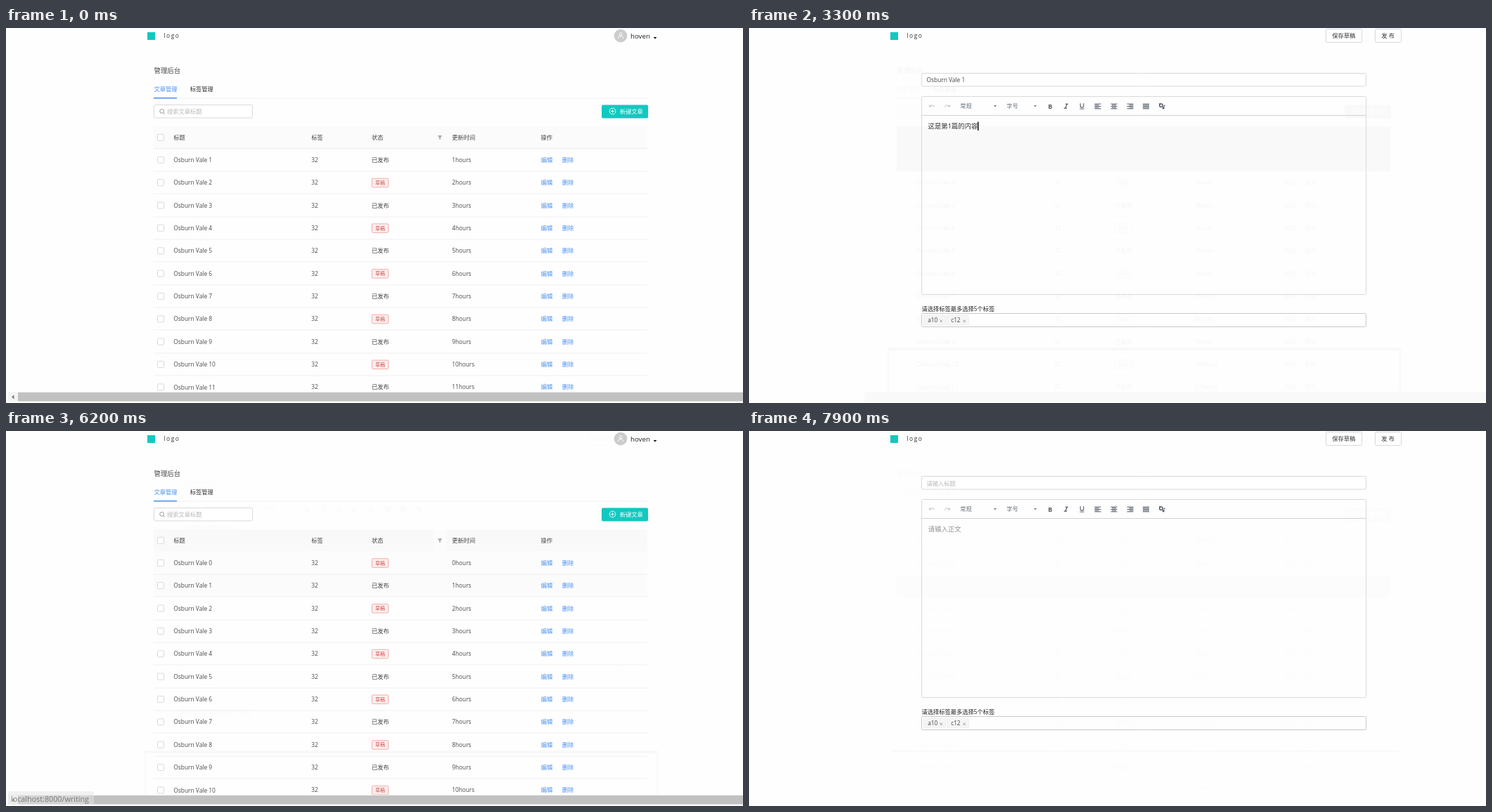
Recreate the animation shown at these times as an HTML page with a canvas. Size 1048x534 px, loop 8000 ms.

```html
<!DOCTYPE html>
<html lang="zh">
<head>
<meta charset="utf-8">
<title>管理后台</title>
<style>
html, body { margin: 0; width: 100%; height: 100%; overflow: hidden; background: #fefefe; }
canvas { display: block; }
</style>
</head>
<body>
<canvas id="stage" width="1048" height="534"></canvas>
<script>
const W = 1048, H = 534, LOOP = 8000, STEP = 100;
const FONT = '"Open Sans", "Noto Sans CJK SC", "Noto Sans CJK", sans-serif';
const BG = '#fefefe', INK = '#4a4a4a', BLUE = '#4a90f5', TEAL = '#13c8c0', BORDER = '#d9d9d9';
const ROW_TOP = 171.6, ROW_H = 32.36, ROWS = 11;
const PERSON = 'Osburn Vale', USER = 'hoven';

const screen = document.getElementById('stage').getContext('2d');
let c = screen;

// drawing helpers
function text(str, x, y, color = INK, size = 8.25, style = '') {
  c.font = `${style} ${size}px ${FONT}`;
  c.fillStyle = color;
  c.fillText(str, x, y + size * 0.37);
}

function rect(x, y, w, h, color) {
  c.fillStyle = color;
  c.fillRect(x, y, w, h);
}

function box(x, y, w, h, stroke, fill, r = 2) {
  c.beginPath();
  c.roundRect(x, y, w, h, r);
  if (fill) { c.fillStyle = fill; c.fill(); }
  if (stroke) { c.strokeStyle = stroke; c.lineWidth = 1; c.stroke(); }
}

function line(points, color, width = 1) {
  c.beginPath();
  points.forEach(([x, y]) => c.lineTo(x, y));
  c.strokeStyle = color;
  c.lineWidth = width;
  c.stroke();
}

function shape(points, color) {
  c.beginPath();
  points.forEach(([x, y]) => c.lineTo(x, y));
  c.fillStyle = color;
  c.fill();
}

function arc(x, y, r, color, width, from = 0, to = Math.PI * 2) {
  c.beginPath();
  c.arc(x, y, r, from, to);
  if (width) { c.strokeStyle = color; c.lineWidth = width; c.stroke(); }
  else { c.fillStyle = color; c.fill(); }
}

function caretDown(x, y, color, r = 2) {
  shape([[x - r, y - r / 2], [x + r, y - r / 2], [x, y + r / 2]], color);
}

// shared header
function brand() {
  rect(201, 6, 11, 11, TEAL);
  c.letterSpacing = '1.5px';
  text('logo', 224.5, 11, '#333', 8.4);
  c.letterSpacing = '0px';
}

function account() {
  arc(874, 11, 9.3, '#ccc');
  arc(874, 8.8, 2, '#fff', 0.9);
  arc(874, 15, 3.7, '#fff', 0.9, Math.PI, 0);
  text(USER, 888, 11.3, '#222', 9.7);
  caretDown(923, 14.3, '#111', 2.5);
}

function checkbox(y) {
  box(215.5, y - 4.5, 9, 9, BORDER, '#fff', 1);
}

function row(i, n) {
  const y = 187.8 + ROW_H * i;
  checkbox(y);
  text(`${PERSON} ${n}`, 238.3, y, INK, 8.4);
  text('32', 434.3, y);
  if (n % 2) {
    text('已发布', 520, y, '#444');
  } else {
    box(520.5, y - 6, 23, 12.5, '#f3aaa6', '#fdf0ef', 1);
    text('草稿', 525, y + 0.2, '#cf4a4a', 7);
  }
  text(`${n}hours`, 634.3, y);
  text('编辑', 760.7, y, BLUE);
  text('删除', 790.7, y, BLUE);
  rect(210, Math.round(ROW_TOP + ROW_H * (i + 1)) - 0.5, 702, 1, '#f2f2f2');
}

function scrollbar() {
  rect(3, 518, W - 3, 14, '#f4f4f4');
  rect(17, 519, W - 17, 12.5, '#c1c1c1');
  shape([[8, 525.5], [11.5, 522.5], [11.5, 528.5]], '#777');
}

function listPage(first, opt = {}) {
  const { ink = 1, header = '#fbfbfb', shades = [], filterCell = false } = opt;
  brand();
  account();
  text('管理后台', 210.5, 60.5, '#444', 9.4);
  rect(210, 99.5, 702, 1, '#f1f1f1');
  text('文章管理', 210.5, 87, BLUE);
  text('标签管理', 261.8, 87, '#333');
  rect(210, 99, 33 * ink, 1.5, BLUE);

  box(210.5, 109.5, 140, 18.5, BORDER, '#fff');
  arc(221.6, 118.4, 2.9, '#888', 0.9);
  line([[223.8, 120.6], [225.8, 122.6]], '#888', 0.9);
  text('搜索文章标题', 229, 119, '#b8b8b8');

  box(847, 109.5, 66, 19, null, TEAL);
  arc(862.5, 118.5, 4.4, '#fff', 0.9);
  line([[860.2, 118.5], [864.8, 118.5]], '#fff', 0.9);
  line([[862.5, 116.2], [862.5, 120.8]], '#fff', 0.9);
  text('新键文章', 872.8, 119, '#fff', 8.25, '500');

  rect(210, 140, 702, 31.5, header);
  if (filterCell) rect(608, 140, 18, 31.5, '#fcfcfc');
  shades.forEach((v, i) => {
    if (v > 0) rect(210, ROW_TOP + ROW_H * i, 702, ROW_H, `rgba(0,0,0,${v / 255})`);
  });
  if (!shades[0]) rect(210, 171, 702, 1, '#ececec');
  checkbox(155.8);
  [['标题', 238.3], ['标签', 434.3], ['状态', 520], ['更新时间', 634.3], ['操作', 760.5]]
    .forEach(([label, x]) => text(label, x, 155.8, '#444'));
  shape([[613.8, 153], [620.2, 153], [618, 156], [618, 158.5], [616, 158.5], [616, 156]], '#aaa');
  for (let i = 0; i < ROWS; i++) row(i, first + i);
  scrollbar();
}

// editor page
const UNDO = new Path2D('M12.5 8c-2.65 0-5.05.99-6.9 2.6L2 7v9h9l-3.62-3.62c1.39-1.16 3.16-1.88 5.12-1.88 3.54 0 6.55 2.31 7.6 5.5l2.37-.78C21.08 11.03 17.15 8 12.5 8z');

function arrow(x, dir) {
  c.save();
  c.translate(x, 111);
  c.scale(0.4 * dir, 0.4);
  c.translate(-12, -12);
  c.fillStyle = '#c4c4c4';
  c.fill(UNDO);
  c.restore();
}

function alignIcon(x, anchor, short) {
  for (let i = 0; i < 5; i++) {
    const w = i % 2 ? short : 9;
    rect(x - 4.5 + (9 - w) * anchor, 107.6 + i * 1.7, w, 1, '#555d6b');
  }
}

function toolbar() {
  const dark = '#555d6b';
  arrow(260, 1);
  arrow(282, -1);
  text('常规', 300.3, 111.3, '#6a717d');
  caretDown(350, 111.3, dark);
  text('字号', 366.3, 111.3, '#6a717d');
  caretDown(407, 111.3, dark);
  text('B', 425.2, 111.2, dark, 9, 'bold');
  line([[449.7, 108.3], [453.8, 108.3]], dark, 1.2);
  line([[452.2, 108], [449.9, 114.5]], dark, 1.2);
  line([[447.8, 114.2], [452, 114.2]], dark, 1.2);
  line([[471.2, 107.3], [471.2, 111]], dark, 1.1);
  line([[475.8, 107.3], [475.8, 111]], dark, 1.1);
  arc(473.5, 111, 2.3, dark, 1.1, 0, Math.PI);
  line([[470.3, 115.2], [476.7, 115.2]], dark, 0.9);
  alignIcon(496, 0, 6);
  alignIcon(519, 0.5, 6);
  alignIcon(542, 1, 6);
  alignIcon(564.5, 0, 9);
  arc(586, 110.3, 2.2, dark, 1.5);
  rect(583.2, 107.3, 2, 2, dark);
  line([[590, 114], [590, 110.3], [592, 110.3]], dark, 1);
  arc(589.2, 114, 1.5, dark);
}

function tag(label, x, w) {
  box(x, 409, w, 14, '#efefef', '#f5f5f5', 1);
  text(label, x + 5.7, 416, '#444');
  const m = x + w - 6.3;
  line([[m - 1.7, 415.6], [m + 1.7, 419]], '#888', 0.8);
  line([[m - 1.7, 419], [m + 1.7, 415.6]], '#888', 0.8);
}

function editorPage(blank, caret) {
  brand();
  box(820.5, 1.5, 51, 19, BORDER, '#fff', 1);
  text('保存草稿', 829.3, 11.3, '#333');
  box(890.5, 1.5, 37, 19, BORDER, '#fff', 1);
  text('发 布', 899.3, 11.3, '#333');

  box(245.5, 64.5, 632, 18.5, BORDER, '#fff');
  if (blank) text('请输入标题', 252.5, 74.5, '#b8b8b8');
  else text(`${PERSON} 1`, 252.5, 74.3, '#444', 8.4);

  box(245.5, 97.5, 632, 282, BORDER);
  line([[246, 124.5], [877, 124.5]], '#d2d2d2');
  toolbar();
  if (blank) text('请输入正文', 254.8, 140, '#8f8f8f', 9.4);
  else text('这是第1篇的内容', 254.5, 140, '#333', 9.4);
  if (caret) rect(325, 133.5, 1.5, 12.5, '#111');

  text('请选择标签最多选择5个标签', 245.5, 400, '#222');
  box(245.5, 406.5, 632, 19, '#c9c9c9');
  tag('a10', 248.5, 31);
  tag('c12', 281.5, 31);
}

// faint remains of the previous page
function snapshot(draw) {
  const layer = document.createElement('canvas');
  layer.width = W;
  layer.height = H;
  c = layer.getContext('2d');
  draw();
  c = screen;
  return layer;
}

function remains(layer, alpha) {
  c.save();
  c.globalAlpha = alpha;
  c.filter = 'grayscale(1)';
  c.drawImage(layer, 0, 0);
  c.restore();
}

function cardEdge() {
  rect(197, 455, 730, 4, '#f8f8f8');
  rect(197, 459, 2, 59, '#f9f9f9');
  rect(925, 459, 2, 59, '#f9f9f9');
}

const oldList = snapshot(() => listPage(1));
const oldEditor = snapshot(() => editorPage(false, false));
const newList = snapshot(() => listPage(0));

// timing
const clamp = v => Math.max(0, Math.min(1, v));
const fade = (t, start, steps) => clamp(((t - start) / STEP + 1) / steps);
const ease = p => p < 0.5 ? 4 * p ** 3 : 1 - 4 * (1 - p) ** 3;

const LINKS = [
  // path, fade-in start and steps, fade-out start and steps
  ['management#', 1000, 2, 1700, 2],
  ['management', 4500, 2, 5200, 2],
  ['writing', 6200, 2, 6600, 2],
  ['writing', 7000, 2, 7700, 3]
];

function statusBar(t) {
  for (const [path, on, onSteps, off, offSteps] of LINKS) {
    const alpha = fade(t, on, onSteps) - fade(t, off, offSteps);
    if (alpha <= 0) continue;
    const label = 'localhost:8000/' + path;
    c.save();
    c.globalAlpha = alpha;
    c.font = `10.75px ${FONT}`;
    const w = c.measureText(label).width + 11;
    box(3, 513, w, 19, null, '#e6e6e6', [0, 2, 0, 0]);
    text(label, 7, 524, '#222', 10.75);
    c.restore();
  }
}

function render(t) {
  rect(0, 0, W, H, BG);
  if (t < 1400) {
    listPage(1, { shades: [5 * fade(t, 600, 3)] });
  } else if (t < 4700) {
    remains(oldList, 0.05);
    rect(210, 140, 702, 64, '#f9f9f9');
    rect(0, 510, 164, 24, BG);
    rect(164, 518, W - 164, 14, '#f9f9f9');
    cardEdge();
    const caret = t >= 2300 && Math.floor((t - 2300) / 500) % 2 === 0;
    editorPage(false, caret);
  } else if (t < 7400) {
    remains(oldEditor, 0.025);
    cardEdge();
    const top = t < 6200 ? 5 : 2 * (1 - fade(t, 6400, 4));
    listPage(0, {
      ink: ease(clamp((t - 4650) / 300)),
      header: '#f9f9f9',
      shades: [top, 3 * fade(t, 5400, 2), 4 * (fade(t, 5400, 2) - fade(t, 5800, 2))],
      filterCell: t >= 6200
    });
  } else {
    remains(newList, 0.015);
    rect(210, 205, 702, 32, '#fcfcfc');
    rect(0, 510, W, 24, BG);
    rect(202, 455, 723, 1, '#f5f5f5');
    editorPage(true, false);
  }
  statusBar(t);
}

function tick() {
  const t = performance.now() % LOOP;
  render(Math.floor(t / STEP) * STEP);
  requestAnimationFrame(tick);
}
tick();
</script>
</body>
</html>
```
